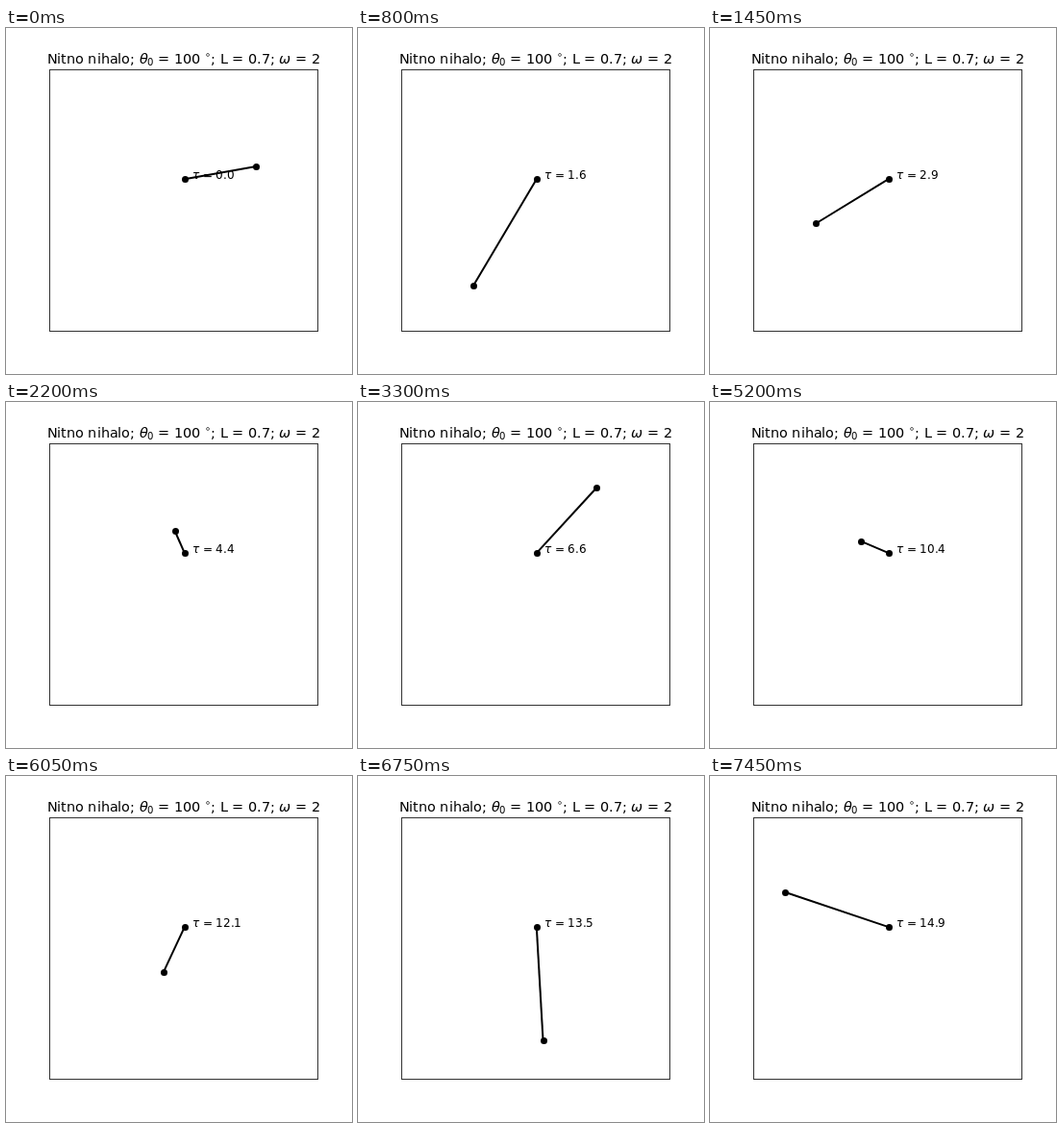
An HTML page with a canvas for the animation above (7500 ms loop, 360 px wide and 360 px high).

```html
<!DOCTYPE html>
<html lang="sl">
<head>
<meta charset="utf-8">
<title>Nitno nihalo</title>
<style>
  html, body { margin: 0; width: 100%; height: 100%; overflow: hidden; background: #fff; }
  canvas { display: block; }
</style>
</head>
<body>
<canvas id="stage" width="360" height="360"></canvas>
<script>
const ctx = document.getElementById("stage").getContext("2d");
const FAMILY = '"DejaVu Sans", sans-serif';

const STEP_MS = 50, STEPS = 150, D_TAU = 0.1;
const OMEGA = 2, SWING = 0.7, START = 100 * Math.PI / 180;
const PIVOT = { x: 185.8, y: 157.15 }, SCALE = 75.7;

const ropeLength = tau => 1 + SWING * Math.sin(tau);

// Pendulum with a periodically changing length; h is the angular momentum.
function slope(tau, [theta, h]) {
  const l = ropeLength(tau);
  return [h / (l * l), -OMEGA * OMEGA * l * Math.sin(theta)];
}

function rk4(tau, s, dt) {
  const move = (k, f) => [s[0] + k[0] * f, s[1] + k[1] * f];
  const a = slope(tau, s);
  const b = slope(tau + dt / 2, move(a, dt / 2));
  const c = slope(tau + dt / 2, move(b, dt / 2));
  const d = slope(tau + dt, move(c, dt));
  return s.map((v, i) => v + dt / 6 * (a[i] + 2 * b[i] + 2 * c[i] + d[i]));
}

function solve() {
  const angles = [], sub = 50, dt = D_TAU / sub;
  let state = [START, 0];
  for (let n = 0; n < STEPS; n++) {
    angles.push(state[0]);
    for (let j = 0; j < sub; j++) state = rk4(n * D_TAU + j * dt, state, dt);
  }
  return angles;
}

const angles = solve();

// Each run: text, italic, size factor, baseline shift
const TITLE = [
  ["Nitno nihalo; "],
  ["θ", true],
  ["0", false, 0.7, 2],
  [" = 100 "],
  ["∘", false, 0.7, -6],
  ["; L = 0.7; "],
  ["ω", true],
  [" = 2"]
];

function setFont(size, italic) {
  ctx.font = (italic ? "italic " : "") + size + "px " + FAMILY;
}

// Glyphs start on whole pixels, while their advances stay fractional.
function drawRuns(runs, x, y, size) {
  for (const [text, italic, factor = 1, shift = 0] of runs) {
    setFont(size * factor, italic);
    for (const glyph of text) {
      ctx.fillText(glyph, Math.floor(x), y + shift);
      x += ctx.measureText(glyph).width;
    }
  }
}

function runsWidth(runs, size) {
  return runs.reduce((sum, [text, italic, factor = 1]) => {
    setFont(size * factor, italic);
    return sum + ctx.measureText(text).width;
  }, 0);
}

// Dots snap to pixel centres.
function dot(x, y) {
  ctx.beginPath();
  ctx.arc(Math.round(x) + 0.5, Math.round(y) + 0.5, 3.5, 0, 2 * Math.PI);
  ctx.fill();
}

function draw(n) {
  const tau = n * D_TAU, r = SCALE * ropeLength(tau);
  const x = PIVOT.x + r * Math.sin(angles[n]);
  const y = PIVOT.y + r * Math.cos(angles[n]);

  ctx.fillStyle = "#fff";
  ctx.fillRect(0, 0, 360, 360);

  ctx.lineWidth = 1;
  ctx.strokeStyle = "#333";
  ctx.strokeRect(45.5, 43.5, 279, 272);

  ctx.fillStyle = ctx.strokeStyle = "#000";
  drawRuns(TITLE, Math.ceil(184.5 - runsWidth(TITLE, 14.4) / 2), 37, 14.4);

  ctx.lineWidth = 2;
  ctx.beginPath();
  ctx.moveTo(PIVOT.x, PIVOT.y);
  ctx.lineTo(x, y);
  ctx.stroke();
  dot(PIVOT.x, PIVOT.y);
  dot(x, y);

  drawRuns([["τ", true], [" = " + tau.toFixed(1)]], 194, 157, 12);
}

const start = performance.now();
function tick() {
  const t = Math.max(0, performance.now() - start);
  draw(Math.floor(t / STEP_MS) % STEPS);
  requestAnimationFrame(tick);
}
tick();
</script>
</body>
</html>
```
